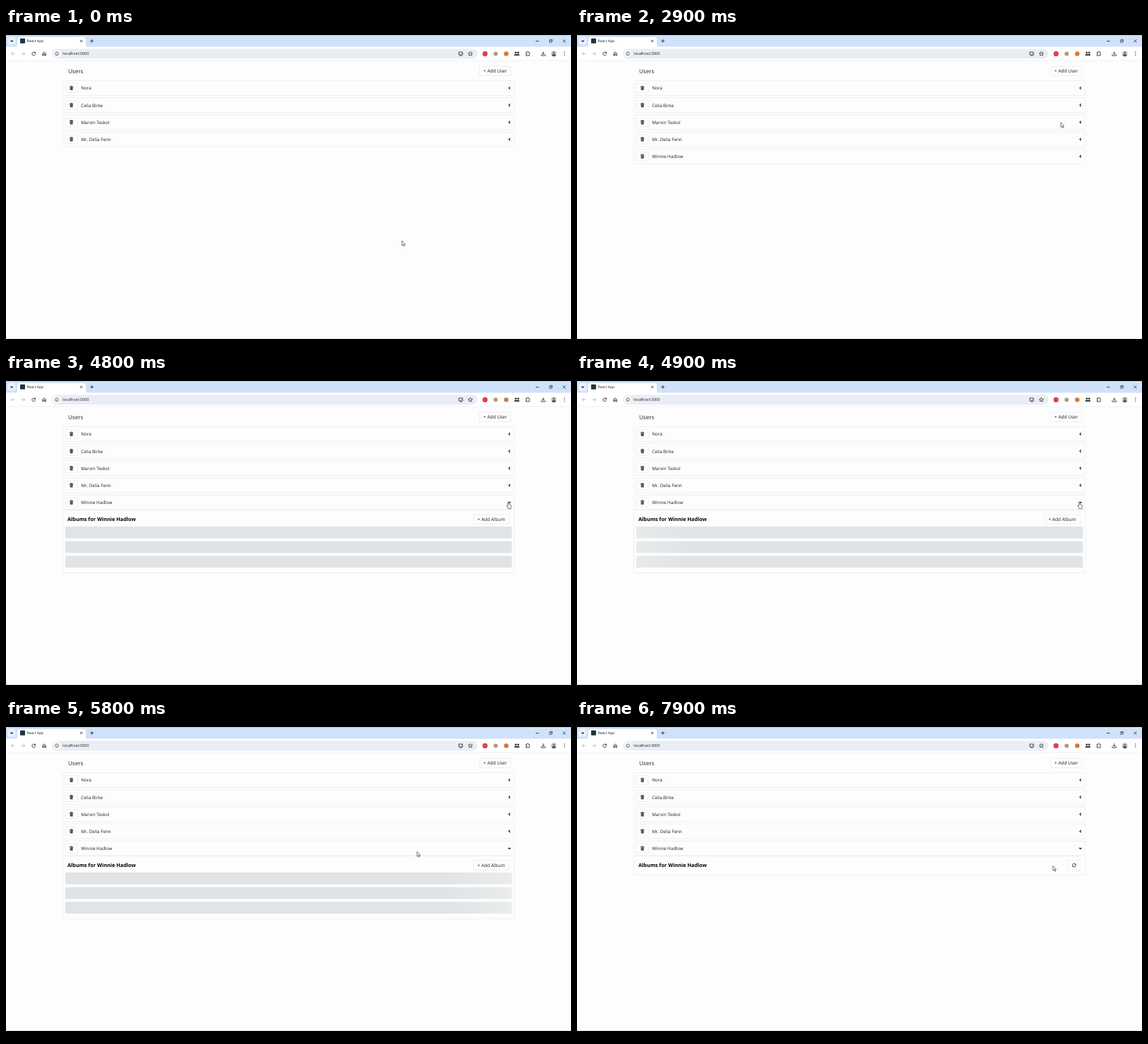
Write an HTML page that moves like this. It is 800x450 px and loops after 8 s.

```html
<!DOCTYPE html>
<html lang="en">
<head>
<meta charset="utf-8">
<title>User albums</title>
<style>
html, body { margin: 0; width: 100%; height: 100%; overflow: hidden; background: #000; }
svg { display: block; width: 800px; height: 450px; }
text { font: 6.3px "Open Sans", "Noto Sans", sans-serif; fill: #1c1c1e; text-rendering: geometricPrecision; white-space: pre; }
.box { fill: none; stroke: #e9ebed; stroke-width: .8; }
.ink { fill: none; stroke: #333; stroke-width: .9; }
.bold { fill: none; stroke: #111; stroke-width: 1.1; }
</style>
</head>
<body>
<svg viewBox="0 0 800 450">
  <defs>
    <linearGradient id="shine" gradientUnits="userSpaceOnUse" x1="84" x2="716" y1="0" y2="0">
      <stop stop-color="#e1e4e6"/><stop offset=".5" stop-color="#fff"/><stop offset="1" stop-color="#e1e4e6"/>
    </linearGradient>
    <g id="trash">
      <rect class="box" x="-8.5" y="-6.3" width="17" height="12.6" rx=".8"/>
      <path d="M-2.2 -1.2H2.2L1.9 3.1H-1.9Z" fill="#555"/>
      <path class="ink" d="M-2.7 -1.9H2.7M-.9 -2.2V-2.8H.9V-2.2"/>
    </g>
    <path id="left" class="bold" d="M.9 -1.7L-.8 0L.9 1.7"/>
    <g id="spinner">
      <path class="ink" d="M-2.3 .4A2.3 2.3 0 0 1 1.7 -1.6M2.3 -.4A2.3 2.3 0 0 1 -1.7 1.6"/>
      <path d="M2.6 -2.6V-.6H.6ZM-2.6 2.6V.6H-.6Z" fill="#333"/>
    </g>
  </defs>

  <rect y="10" width="800" height="430" fill="#fefdfe"/>

  <!-- tab strip -->
  <rect y="10" width="800" height="17" fill="#d0e1fa"/>
  <rect x="2.5" y="12.8" width="11" height="11" rx="3.5" fill="#e9f1fe"/>
  <path class="bold" d="M6.5 17.6L8.2 19.2L9.9 17.6"/>
  <path d="M13 27Q16 27 16 24V16.5Q16 13 19.5 13H109.5Q113 13 113 16.5V24Q113 27 116 27Z" fill="#fff"/>
  <rect x="20" y="14.7" width="7" height="7" rx=".8" fill="#20343d"/>
  <text x="29.6" y="20.3" style="font-size:5px">React App</text>
  <path class="ink" d="M105 16.8L108.2 20M108.2 16.8L105 20M119.2 18.4H124M121.6 16V20.8M750 18.6H754.5M788.5 16.6L792.3 20.4M792.3 16.6L788.5 20.4"/>
  <path class="ink" d="M769.4 17.4H772.3V20.3H769.4ZM770.5 17.2V16.3H773.4V19.2H772.5" style="stroke-width:.7"/>

  <!-- toolbar -->
  <rect y="26.5" width="800" height="19" fill="#fff"/>
  <path d="M0 46H800" stroke="#ececef" stroke-width=".8"/>
  <rect x="65" y="29.4" width="602.5" height="14" rx="7" fill="#e9eef4"/>
  <path class="ink" style="stroke:#b9bbc0" d="M12.4 36.3H7.4M9.7 34L7.4 36.3L9.7 38.6M21.6 36.3H26.6M24.3 34L26.6 36.3L24.3 38.6"/>
  <path class="ink" d="M41.2 35.1A2.4 2.4 0 1 0 41.6 37M41.7 33.6V35.6H39.7M51.9 35.8L54.1 34L56.3 35.8V39H55V36.8H53.2V39H51.9Z"/>
  <circle cx="72" cy="36.3" r="4.9" fill="#fff"/>
  <circle class="ink" cx="72" cy="36.3" r="2.5" style="stroke-width:.7"/>
  <path class="ink" d="M72 35.9V37.8M72 34.7V35.3" style="stroke-width:.7"/>
  <text x="80.3" y="38.3" style="font-size:5.5px">localhost:3000</text>
  <path class="ink" d="M644.5 34H641.2V38H646.8V36.7M642.6 39.2H645.4M645.9 33.2V36M644.7 35L645.9 36.2L647.1 35"/>
  <path class="ink" d="M657.5 33.4L658.4 35.3L660.5 35.5L658.9 36.9L659.4 39L657.5 37.9L655.6 39L656.1 36.9L654.5 35.5L656.6 35.3Z" style="stroke-width:.8"/>
  <circle cx="678.3" cy="36.4" r="3.6" fill="#e3404b"/>
  <circle cx="693.3" cy="36.4" r="3" fill="#b39a80"/>
  <circle cx="708.3" cy="36.4" r="3.2" fill="#dd7630"/>
  <g fill="#333">
    <circle cx="721.8" cy="34.9" r="1.4"/><circle cx="725.2" cy="34.9" r="1.4"/>
    <path d="M719.6 39V37.8Q721.8 36 723.5 37.2Q725.2 36 727 37.8V39Z"/>
    <circle cx="790.8" cy="34" r=".65"/><circle cx="790.8" cy="36.3" r=".65"/><circle cx="790.8" cy="38.6" r=".65"/>
  </g>
  <path class="ink" d="M736.2 34.4H737.7Q737.7 33.2 738.7 33.2T739.7 34.4H741.1V39H736.2V37.6Q737.7 37.5 737.7 36.6T736.2 35.8Z"/>
  <path class="ink" d="M760.7 33.3V37.2M758.9 35.6L760.7 37.4L762.5 35.6M757.9 37.4V39.1H763.5V37.4"/>
  <circle cx="775.7" cy="36.3" r="4" fill="#c9cbd0"/>
  <circle cx="775.7" cy="34.9" r="1.5" fill="#776a6a"/>
  <path d="M772.8 39Q773.2 36.8 775.7 36.8T778.6 39Q775.7 41.5 772.8 39Z" fill="#50545f"/>

  <!-- page -->
  <text x="88" y="63.8" style="font-size:8px">Users</text>
  <g id="rows"></g>
  <g id="addUser"></g>
  <g id="panel">
    <rect id="frame" class="box" x="80.4" y="192.2" width="639.2" rx="1"/>
    <text x="87" y="208.3" style="font-size:7.3px;font-weight:700;fill:#000">Albums for Winnie Hadlow</text>
    <g id="addAlbum"></g>
    <g id="bars" fill="url(#shine)">
      <rect x="83.7" y="215.8" width="632.6" height="16.7" rx="1.5"/>
      <rect x="83.7" y="236.5" width="632.6" height="16.7" rx="1.5"/>
      <rect x="83.7" y="257.2" width="632.6" height="16.7" rx="1.5"/>
    </g>
  </g>

  <g id="cursor" fill="#fff" stroke="#222" stroke-width=".6" stroke-linejoin="round">
    <path id="arrow" d="M0 0V6.9L1.6 5.5L2.7 7.9L3.7 7.4L2.6 5.1H4.6Z"/>
    <path id="hand" d="M-.8 .6Q0 -.4 .7 .6V3.4L3.3 4Q4.1 4.3 4 5.2L3.5 7.4V9.2H-.8V8.2L-2.6 5.6Q-2.6 4.5 -1.6 5L-.8 5.7Z"/>
  </g>
</svg>
<script>
const $ = id => document.getElementById(id);
const show = (el, on) => el.setAttribute("display", on ? "inline" : "none");
const LOOP = 8000, ROW_ADDED = 2200, OPENED = 4790, LOADED = 6200;
const names = ["Nora", "Celia Birke", "Marvin Teskol", "Mr. Delia Fenn", "Winnie Hadlow"];

$("rows").innerHTML = names.map((name, i) => {
  const y = 85 + i * 24.17;
  return `<g><rect class="box" x="80.4" y="${y - 10.4}" width="639.2" height="20.8" rx="1"/>
    <use href="#trash" x="92.6" y="${y}"/><text x="106.2" y="${y + 2.4}">${name}</text>
    <use class="chevron" href="#left" transform="translate(712.8 ${y})"/></g>`;
}).join("");
const lastRow = $("rows").lastElementChild, chevron = lastRow.querySelector(".chevron");

// A button that can swap its label for a spinner; returns its setter.
function button(id, right, y, width, label) {
  $(id).innerHTML = `<g><rect class="box" x="${right - width}" y="${y - 6.7}" width="${width}" height="13.4" rx="1"/>
    <text x="${right - width + 5.5}" y="${y + 2.3}" style="font-size:6.5px">${label}</text></g>
    <g><rect class="box" x="${right - 18}" y="${y - 6.7}" width="18" height="13.4" rx="1"/><use href="#spinner"/></g>`;
  const [idle, busy] = $(id).children, icon = busy.querySelector("use");
  return (loading, t) => {
    show(idle, !loading);
    show(busy, loading);
    icon.setAttribute("transform", `translate(${right - 9} ${y}) rotate(${t * .36 % 360})`);
  };
}
const setUser = button("addUser", 715, 60.8, 44.5, "+ Add User");
const setAlbum = button("addAlbum", 713, 205.6, 51, "+ Add Album");

// Cursor stops: time, x, y
const path = [
  [0, 560.7, 301], [300, 560.7, 301], [1200, 685.3, 62.5], [1300, 685.3, 60.5], [2500, 685.3, 60.5],
  [3200, 685, 181], [3600, 684, 201], [4000, 683.3, 181.8], [4600, 711.5, 181.3], [5000, 711.5, 181.3],
  [5800, 582, 186.3], [6500, 396.6, 288.6], [6900, 655, 212], [7200, 674, 206.4], [LOOP, 674, 206.4]
];
const hands = [[1200, 1800], [2200, 2600], [4500, 5100], [7000, 7600]];
const within = (t, [from, to]) => t >= from && t < to;

function cursorAt(t) {
  const i = path.findIndex(p => p[0] > t);
  const [t0, x0, y0] = path[i - 1], [t1, x1, y1] = path[i];
  const u = (t - t0) / (t1 - t0), k = u * u * (3 - 2 * u);
  return [x0 + (x1 - x0) * k, y0 + (y1 - y0) * k];
}

// CSS "ease", cubic-bezier(.25, .1, .25, 1)
function ease(x) {
  const curve = (a, b, s) => 3 * a * s * (1 - s) ** 2 + 3 * b * s * s * (1 - s) + s ** 3;
  let lo = 0, hi = 1;
  for (let i = 0; i < 20; i++) {
    const mid = (lo + hi) / 2;
    if (curve(.25, .25, mid) < x) lo = mid; else hi = mid;
  }
  return curve(.1, 1, lo);
}

function draw(t) {
  const open = t >= OPENED, loading = open && t < LOADED;
  setUser(within(t, [1800, ROW_ADDED]), t);
  setAlbum(t >= 7600, t - 7900);
  show(lastRow, t >= ROW_ADDED);
  chevron.setAttribute("transform", `translate(712.8 181.7) rotate(${open ? -90 : 0})`);

  show($("panel"), open);
  show($("bars"), loading);
  $("frame").setAttribute("height", loading ? 89.2 : 27);
  if (loading) {
    const shift = 632 * (2 * ease((t - OPENED) % 1500 / 1500) - 1);
    $("shine").setAttribute("gradientTransform", `translate(${shift} 0)`);
  }

  const hand = hands.some(span => within(t, span));
  show($("hand"), hand);
  show($("arrow"), !hand);
  $("cursor").setAttribute("transform", `translate(${cursorAt(t)})`);
}

function tick(now) {
  draw(Math.floor(now % LOOP / 100) * 100);
  requestAnimationFrame(tick);
}
draw(0);
requestAnimationFrame(tick);
</script>
</body>
</html>
```
